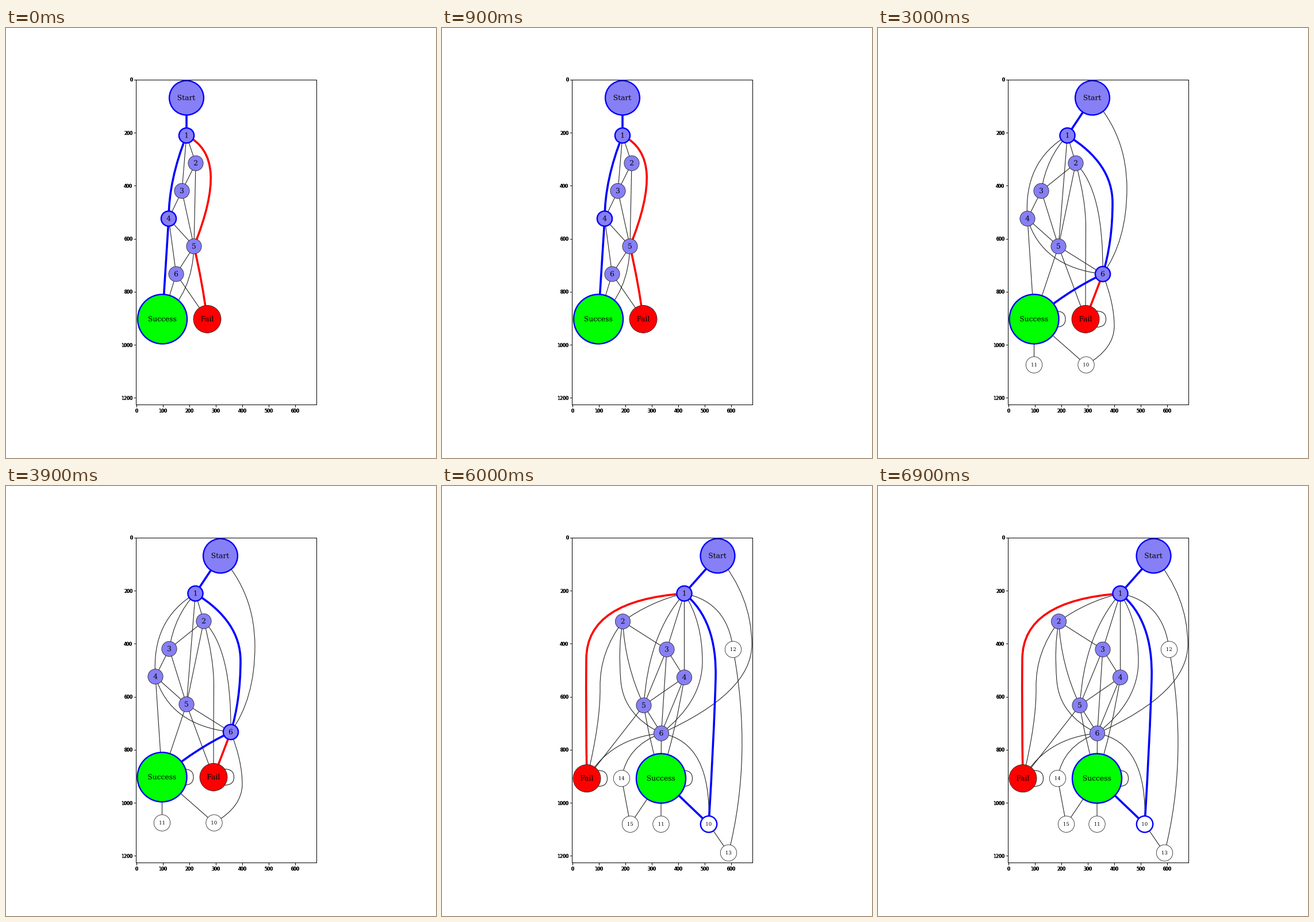
Animation, 748 px wide and 748 px high, one loop 7500 ms. Source, as a matplotlib script:

```python
import numpy as np
import matplotlib.pyplot as plt
from matplotlib.animation import FuncAnimation
from matplotlib.patches import Circle, PathPatch
from matplotlib.path import Path
from matplotlib.textpath import TextPath
from matplotlib.transforms import Affine2D

SIDE, DPI = 748, 68
PX = 72 / DPI  # points per pixel
BLUE, RED, GREEN, LILAC, INK = "#0000ff", "#ff0000", "#00ff00", "#877ff5", "#222222"
LABELS = {"S": "Start", "W": "Success", "F": "Fail"}
FILLS = {"W": GREEN, "F": RED}
RADII = {"S": 29.9, "W": 43, "F": 24}
RANKS = dict(zip("S123456WF", [*range(8), 7]))

fig = plt.figure(figsize=(SIDE / DPI, SIDE / DPI), dpi=DPI, facecolor="white")
stage = fig.add_axes([0, 0, 1, 1])
stage.set(xlim=(0, SIDE), ylim=(SIDE, 0))
stage.axis("off")

# The frame is stacked once per graph, which thickens the tick labels.
box = np.array([226.3, 93.3, 313.9, 565]) / SIDE
for k in range(5):
    ax = fig.add_axes(box, label=f"frame{k}", facecolor="none")
    ax.set(xlim=(-0.5, 680.3), ylim=(1224.8, -0.5))
    ax.set_xticks(range(0, 601, 100))
    ax.set_yticks(range(0, 1201, 200))
    ax.tick_params(labelsize=8 * PX, length=3.5 * PX, pad=3.5 * PX,
                   width=0.8 * PX, labelfontfamily="DejaVu Sans")
    ax.tick_params(axis="y", pad=2.7 * PX)
    for spine in ax.spines.values():
        spine.set_linewidth(0.8 * PX)


def curve(start, bends, end, color=INK, width=1.1, z=1):
    """Quadratic B-spline that leans on the bends."""
    points = [start]
    for i, bend in enumerate(bends):
        if i:
            points.append(np.add(bends[i - 1], bend) / 2)
        points.append(bend)
    points.append(end)
    kind = Path.CURVE3 if bends else Path.LINETO
    path = Path(points, [Path.MOVETO] + [kind] * (len(points) - 1))
    stage.add_patch(PathPatch(path, fc="none", ec=color, lw=width * PX, zorder=z,
                              snap=False, capstyle="butt"))


def write(text, x, y, size):
    path = TextPath((0, 0), text, size=size, prop={"family": "DejaVu Serif"})
    ext = path.get_extents()
    move = Affine2D().scale(1, -1).translate(x - (ext.x0 + ext.x1) / 2, y + 0.31 * size)
    stage.add_patch(PathPatch(move.transform_path(path), fc="black", lw=0, zorder=4))


def links(path):
    names = path.split()
    return [{a, b} for a, b in zip(names, names[1:])]


class Graph:
    """Nodes sit on ranks; an edge bends at (x, rank) points or runs straight."""

    def __init__(self, step, xs, extra, straight, bent, blue, red, loops=True):
        last = 187 + 5 * step
        self.heights = [121.5, *(187 + step * np.arange(6)),
                        last + 78.4, last + 158, last + 208]
        spots = {n: (x, RANKS[n]) for n, x in zip(RANKS, xs)} | extra
        self.nodes = {n: self.at(*spot) for n, spot in spots.items()}
        self.edges = dict.fromkeys(straight.split(), []) | bent
        self.blue, self.red, self.loops = blue, red, loops

    def at(self, x, rank):
        return x, np.interp(rank, range(10), self.heights)

    def draw(self):
        for edge, bends in self.edges.items():
            a, b = edge.split("-")
            style = ()
            if {a, b} in links(self.blue):
                style = BLUE, 3.6, 2
            elif {a, b} in links(self.red):
                style = RED, 3.6, 2
            curve(self.nodes[a], [self.at(*p) for p in bends], self.nodes[b], *style)
        if self.loops:
            self.loop("W")
            self.loop("F")
        for name, (x, y) in self.nodes.items():
            self.node(name, x, y)

    def loop(self, name, h=14):
        x, y = self.nodes[name]
        x += RADII[name]
        curve((x - 5, y - h), [(x + 11.5, y - h), (x + 11.5, y + h)], (x - 5, y + h))

    def node(self, name, x, y):
        extra = len(name) > 1
        on = name in self.blue.split()
        fill = "white" if extra else FILLS.get(name, LILAC)
        radius = RADII.get(name, 14.2 if extra else 13.1)
        stage.add_patch(Circle((x, y), radius, fc=fill, ec=BLUE if on else INK,
                               lw=(2.4 if on else 0.8) * PX, zorder=3))
        write(LABELS.get(name, name), x, y, 8.6 if extra else 12.3)


graphs = [
    Graph(48.2, (314, 314, 330, 306, 283, 327, 296, 272, 350), {},
          "S-1 1-2 1-3 2-3 2-5 3-4 3-5 4-5 4-6 4-W 5-6 6-W 6-F",
          {"1-4": [(283, 2.6)], "1-5": [(353, 1.4), (359, 3.35)],
           "5-F": [(342, 6.2)], "5-W": [(325, 6.4)]},
          "S 1 4 W", "1 5 F", loops=False),
    Graph(48.2, (351, 351, 381, 358, 297, 358, 319, 311, 400.5), {"10": (242.5, 7)},
          "S-1 1-2 1-3 2-3 3-4 3-5 4-5 4-6 5-6 5-W 5-F 6-W",
          {"1-4": [(300, 2)], "1-5": [(408, 1.4), (412, 3.35)],
           "1-6": [(328, 2.4), (329, 4.4)], "2-5": [(378, 3.5)],
           "4-W": [(293, 5.8)], "6-10": [(257, 6.2)], "6-F": [(375, 6.3)]},
          "S 1 6 W", "6 F"),
    Graph(48.2, (373, 329.5, 344, 284, 260, 314, 391, 271.5, 361),
          {"11": (271.5, 8), "10": (362, 8)},
          "S-1 1-2 1-5 2-3 2-5 3-4 3-5 4-5 4-W 5-6 5-W 5-F 6-F W-11 W-10",
          {"S-6": [(433, 1), (433, 4.8)], "1-3": [(293, 1.8)], "1-4": [(252, 1.95)],
           "1-6": [(408, 2), (408, 4.85)], "2-F": [(362, 3.35), (361, 5.4)],
           "2-6": [(393, 3)], "4-6": [(285, 5.75)], "6-W": [(326, 6.4)],
           "6-10": [(411, 6.65), (411, 7.65)]},
          "S 1 6 W", "6 F"),
    Graph(48.65, (415.5, 361, 375.5, 315, 268, 322, 370, 298.5, 411),
          {"12": (242, 3), "11": (298.5, 8), "10": (353.5, 8), "13": (287.5, 9)},
          "S-1 1-2 1-5 2-3 3-4 3-6 4-5 4-W 5-6 5-W 6-W 6-F 6-10 W-11 W-10 10-13",
          {"S-6": [(487, 1.15), (487, 4.6)], "1-12": [(253, 1.25)],
           "12-13": [(238, 5.4), (236, 7.6)], "1-3": [(326, 1.85)], "1-4": [(284, 2.3)],
           "1-6": [(440, 2), (440, 4.9)],
           "1-10": [(430, 1.27), (446, 2.8), (497, 6.1), (470, 7.67)],
           "2-5": [(375, 3.95)], "2-6": [(388, 4)], "2-F": [(415, 3), (418, 5.4)],
           "3-5": [(306, 3.85)], "4-6": [(293, 5.55)], "5-F": [(354, 6.3)]},
          "S 1 10 W", "1 6 F"),
    Graph(48.65, (479.5, 421.5, 314.5, 391, 421.5, 351, 381.5, 381, 252),
          {"12": (506.5, 3), "14": (312.5, 7), "15": (327.5, 8), "11": (381, 8),
           "10": (464, 8), "13": (498.5, 9)},
          "S-1 1-3 1-4 2-3 3-4 3-5 3-6 4-5 4-6 5-6 5-F 6-W W-10 W-11 W-15 14-15 10-13",
          {"S-6": [(539, 1.1), (539, 4.55)], "1-2": [(364, 1.27)], "1-5": [(359, 2.45)],
           "1-6": [(453, 2), (453, 4.85)], "1-10": [(479, 1.95), (473, 6.1)],
           "1-12": [(497, 1.3)], "1-F": [(252, 1.25), (250, 5.4)], "2-5": [(318, 3.55)],
           "2-6": [(306, 2.9), (316, 5.35)], "2-F": [(274, 3.1), (276, 5.6)],
           "4-W": [(408, 5.8)], "5-W": [(361, 6.2)], "6-F": [(293, 6.1)],
           "6-14": [(321, 6.28)], "6-10": [(470, 6.2)], "12-13": [(541, 6.5)]},
          "S 1 10 W", "1 F"),
]


def update(i):
    for patch in list(stage.patches):
        patch.remove()
    graphs[i].draw()
    return []


anim = FuncAnimation(fig, update, frames=len(graphs), init_func=lambda: [],
                     interval=1500, repeat=True, repeat_delay=0, blit=False)
plt.show()
```
